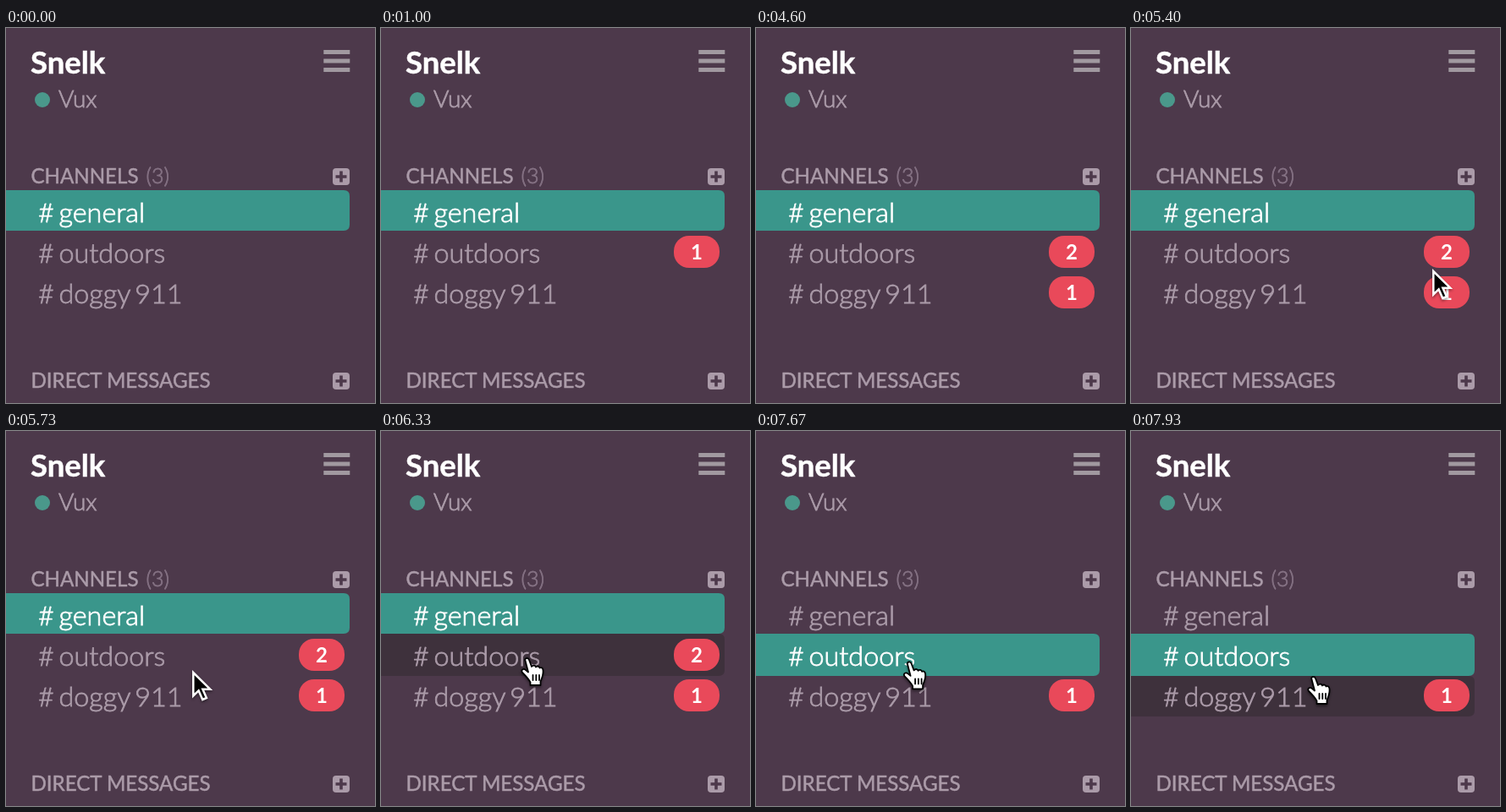
Recreate the animation shown at these times as an HTML page. Size 436 px wide and 444 px high, loop 8 s.

```html
<!DOCTYPE html>
<html lang="en">
<head>
<meta charset="utf-8">
<style>
  html, body { margin: 0; width: 100%; height: 100%; overflow: hidden; background: #4d394b; }
  svg { display: block; font-family: Lato, sans-serif; color: #ab9ba9; fill: currentColor; }
  /* A thin outline gives the heavier look of smoothed text. */
  text { fill: currentColor; stroke: currentColor; stroke-width: .5; }
  .title { font-size: 36.5px; font-weight: 700; color: #fff; }
  .head { font-size: 24.1px; }
  .user, .count, .channel { font-weight: 300; stroke-width: .8; }
  .user { font-size: 28px; }
  .count { font-size: 25px; color: #857284; }
  .channel { font-size: 32.3px; word-spacing: -3px; }
  .active { color: #fff; }
  .badge rect { fill: #e9495a; }
  .badge text { font-size: 24px; font-weight: 700; color: #fff; stroke: none; text-anchor: middle; }
  #arrow, #hand { filter: drop-shadow(0 2px 1.5px #0006); }
</style>
</head>
<body>
<svg width="436" height="444" viewBox="0 0 436 444">
  <defs>
    <g id="plus">
      <rect width="20" height="20" rx="4"/>
      <path d="M3.5 10h13M10 3.5v13" stroke="#4d394b" stroke-width="3.6"/>
    </g>
    <path id="row" d="M0 0H399Q406 0 406 7V41Q406 48 399 48H0Z"/>
    <path id="tallRow" d="M0 0H399Q406 0 406 7V43Q406 50 399 50H0Z"/>
  </defs>

  <text class="title" x="29" y="54">Snelk</text>
  <path d="M375.3 28.5h31M375.3 39h31M375.3 49.5h31" stroke="#a199a0" stroke-width="5"/>
  <circle cx="43" cy="85" r="9" fill="#4a988b"/>
  <text class="user" x="62" y="94">Vux</text>

  <text class="head" x="29.5" y="184">CHANNELS</text>
  <text class="count" x="165.5" y="184">(3)</text>
  <use href="#plus" x="386" y="166"/>
  <text class="head" x="29.5" y="426">DIRECT MESSAGES</text>
  <use href="#plus" x="386" y="408"/>

  <use id="hover1" href="#tallRow" y="240" fill="#3e313c"/>
  <use id="hover2" href="#row" y="290" fill="#3e313c"/>
  <use id="current" fill="#3a968b"/>
  <text id="general" class="channel" x="38" y="230"># general</text>
  <text id="outdoors" class="channel" x="38" y="278"># outdoors</text>
  <text class="channel" x="38" y="326"># doggy 911</text>

  <g id="badge1" class="badge">
    <rect x="346" y="246" width="54" height="38" rx="18"/>
    <text id="unread" x="373" y="274">1</text>
  </g>
  <g id="badge2" class="badge">
    <rect x="346" y="294" width="54" height="38" rx="18"/>
    <text x="373" y="322">1</text>
  </g>

  <g id="arrow">
    <path d="M1.3 3V30.5L7.6 24.4 12.3 35 16.9 33 12.4 22.7H21.2Z" fill="#000" stroke="#fff" stroke-width="2.5"/>
  </g>
  <g id="hand">
    <g transform="translate(-7 -1)" stroke="#000" stroke-width="1.8" stroke-linecap="round" stroke-linejoin="round">
      <path fill="#fff" d="M5.5 4C4 .8 9 -.2 10 3L13 11C15 8.7 17.5 9.5 18 11.5C19.5 9.7 22 10.5 22.5 12.5C24.5 11.3 26.5 12.7 26.5 15.5C27 20 25.5 24 23.5 28.5V33H11.5V29.5C9 25 5 21 2 18C0 15 3 12.5 6 15L9 17.5Z"/>
      <path fill="none" d="M14.5 21v6M18.3 21v6M22 21v6"/>
    </g>
  </g>
</svg>
<script>
  const $ = id => document.getElementById(id);
  const LOOP = 8000, FPS = 15;
  // Pointer tip: [tick, x, y]
  const path = [
    [76, 410, 268], [79, 410, 268], [83, 302, 302], [86, 220, 283], [89, 184, 281],
    [92, 184, 281], [95, 172, 269], [114, 172, 269], [119, 215, 291]
  ];

  const ramp = (t, a, b) => Math.max(0, Math.min(1, (t - a) / (b - a)));
  const show = (id, on) => $(id).style.display = on ? "" : "none";

  function pointer(t) {
    const i = Math.max(1, path.findIndex(k => k[0] >= t));
    const [a, x0, y0] = path[i - 1], [b, x1, y1] = path[i];
    const p = ramp(t, a, b);
    return [x0 + (x1 - x0) * p, y0 + (y1 - y0) * p];
  }

  function draw(t) {
    const picked = t >= 99;
    show("badge1", t >= 9 && t < 100);
    show("badge2", t >= 69);
    $("unread").textContent = t < 30 ? 1 : 2;

    $("hover1").style.opacity = picked ? 0 : ramp(t, 92, 95);
    $("hover2").style.opacity = ramp(t, 116, 119);
    $("current").setAttribute("href", picked ? "#tallRow" : "#row");
    $("current").setAttribute("y", picked ? 240 : 192);
    $("general").classList.toggle("active", !picked);
    $("outdoors").classList.toggle("active", picked);

    const [x, y] = pointer(t);
    show("arrow", t >= 76 && t < 94);
    show("hand", t >= 94);
    for (const id of ["arrow", "hand"]) $(id).setAttribute("transform", `translate(${x} ${y})`);
  }

  const start = performance.now();
  function tick() {
    const ms = (performance.now() - start) % LOOP;
    draw(Math.min(119, Math.floor((ms + 4) * FPS / 1000)));
    requestAnimationFrame(tick);
  }
  tick();
</script>
</body>
</html>
```
